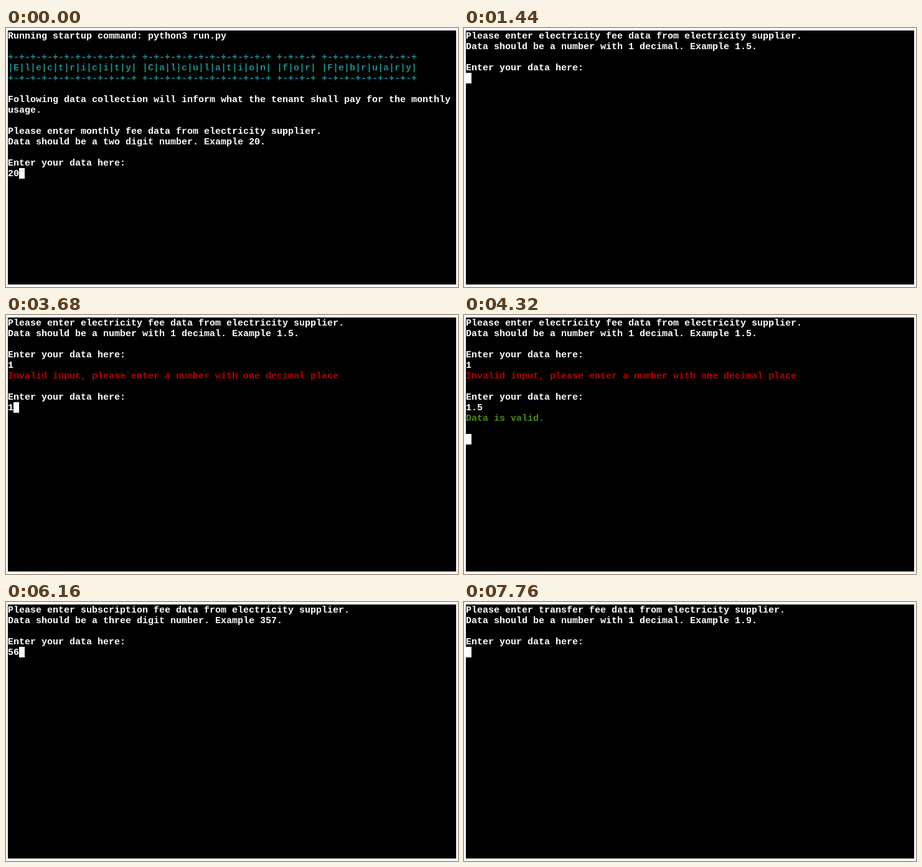
Write an HTML page that moves like this. It is 726x416 px and loops after 8000 ms.

```html
<!DOCTYPE html>
<html lang="en">
<head>
<meta charset="utf-8">
<title>Electricity calculation terminal</title>
<style>
  html, body { margin: 0; width: 100%; height: 100%; overflow: hidden; background: #fff; }
  svg { display: block; }
  text { font: bold 15px Courier, "Courier New", "Liberation Mono", monospace; white-space: pre; }
</style>
</head>
<body>
<svg width="726" height="416" viewBox="0 0 726 416">
  <rect x="3" y="4" width="720" height="408"/>
  <g id="lines"></g>
  <rect id="cursor" width="9" height="17" fill="#fff"/>
</svg>
<script>
const DURATION = 8000, LEFT = 3, TOP = 4, COL = 9, ROW = 17, BASELINE = 13;
const WHITE = '#fff', TEAL = '#178e90', RED = '#b40000', GREEN = '#4a8c14';
const SVG_NS = 'http://www.w3.org/2000/svg';
const lineGroup = document.getElementById('lines');
const cursor = document.getElementById('cursor');

const line = (text, color = WHITE) => ({ text, color });
const plain = (...texts) => texts.map(text => line(text));

const words = ['Electricity', 'Calculation', 'for', 'February'];
const rule = words.map(word => '+-'.repeat(word.length) + '+').join(' ');
const letters = words.map(word => '|' + [...word].join('|') + '|').join(' ');
const banner = [rule, letters, rule].map(text => line(text, TEAL));

const prompt = plain('', 'Enter your data here:');
const valid = [line('Data is valid.', GREEN), line(''), line('')];
const question = (fee, hint) => [
  ...plain(`Please enter ${fee} fee data from electricity supplier.`, `Data should be a ${hint}.`),
  ...prompt
];

const monthly = [
  ...plain('Running startup command: python3 run.py', ''),
  ...banner,
  ...plain('', 'Following data collection will inform what the tenant shall pay for the monthly', 'usage.', ''),
  ...question('monthly', 'two digit number. Example 20')
];
const electricity = question('electricity', 'number with 1 decimal. Example 1.5');
const retry = [
  ...electricity,
  line('1'),
  line('Invalid input, please enter a number with one decimal place', RED),
  ...prompt
];
const subscription = question('subscription', 'three digit number. Example 357');
const transfer = question('transfer', 'number with 1 decimal. Example 1.9');

// Each step: start time, screen, typed input, whether it was accepted.
const steps = [
  [0, monthly, '20'],
  [240, monthly, '20', true],
  [1440, electricity, ''],
  [2880, electricity, '1'],
  [2960, retry, ''],
  [3680, retry, '1'],
  [3840, retry, '1.'],
  [4080, retry, '1.5'],
  [4320, retry, '1.5', true],
  [5360, subscription, ''],
  [6080, subscription, '5'],
  [6160, subscription, '56'],
  [6320, subscription, '569'],
  [6560, subscription, '569', true],
  [7760, transfer, '']
];

function drawLine({ text, color }, row) {
  const node = document.createElementNS(SVG_NS, 'text');
  node.setAttribute('x', LEFT);
  node.setAttribute('y', TOP + row * ROW + BASELINE);
  node.setAttribute('fill', color);
  node.textContent = text;
  return node;
}

let shown;
function render(time) {
  const step = steps.findLast(([start]) => start <= time);
  if (step === shown) return;
  shown = step;
  const [, screen, input, accepted] = step;
  const content = [...screen, line(input), ...(accepted ? valid : [])];
  lineGroup.replaceChildren(...content.map(drawLine));
  cursor.setAttribute('x', LEFT + content.at(-1).text.length * COL);
  cursor.setAttribute('y', TOP + (content.length - 1) * ROW);
}

const startTime = performance.now();
function tick() {
  render((performance.now() - startTime) % DURATION);
  requestAnimationFrame(tick);
}
tick();
</script>
</body>
</html>
```
